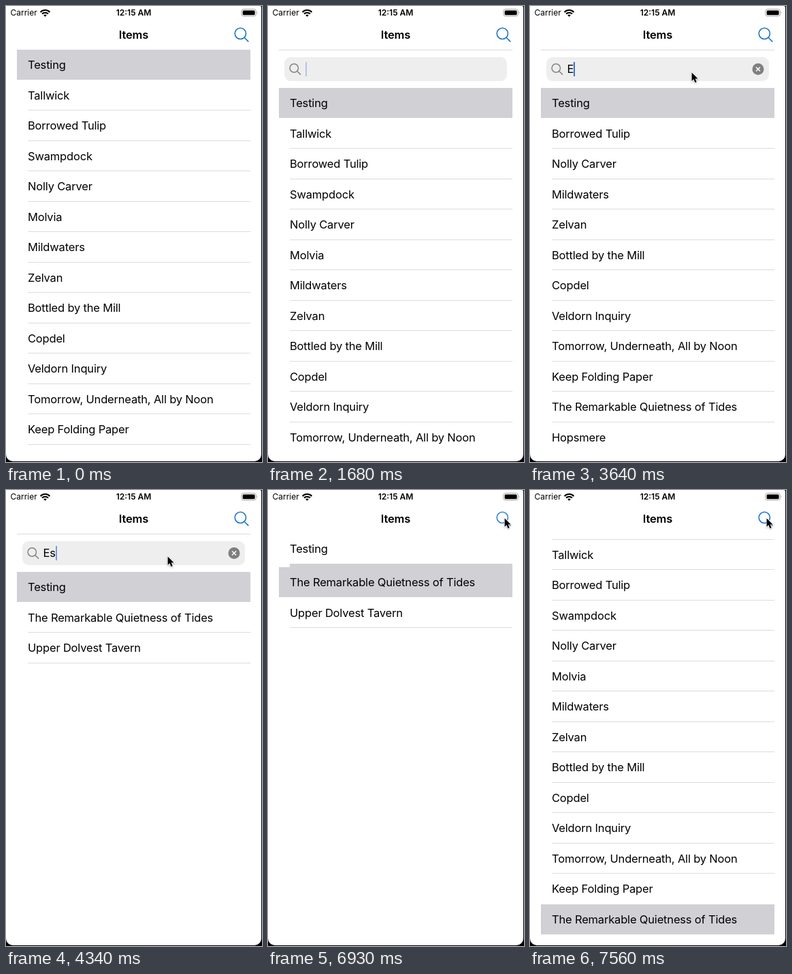
Write an HTML page that moves like this. It is 376 px wide and 668 px high and loops after 8000 ms.

```html
<!DOCTYPE html>
<html lang="en">
<head>
<meta charset="utf-8">
<title>Items</title>
<style>
  html, body { margin: 0; width: 100%; height: 100%; overflow: hidden; background: #000; }
  #screen {
    position: absolute; left: 0; top: 0; width: 375px; height: 667px;
    background: #fff; border-radius: 0 2px 10px 10px; overflow: hidden;
    font: 16.5px Inter, Roboto, sans-serif; letter-spacing: -.18px; color: #000;
  }
  #screen * { position: absolute; white-space: pre; }
  .status { top: 0; line-height: 20px; font-size: 12px; letter-spacing: 0; }
  #carrier { left: 6.5px; }
  #clock { left: 0; width: 375px; text-align: center; font-weight: 600; }
  #title { left: 0; width: 375px; top: 22px; line-height: 40px; text-align: center; font-weight: 600; }
  #screen svg { left: 0; top: 0; }
  #view { left: 16px; top: 64px; width: 343px; height: 587.5px; overflow: hidden; }
  .rule { left: 0; width: 343px; height: 1px; background: #dcdcde; }
  #bar { left: 8px; top: 10.5px; width: 327px; height: 35px; border-radius: 9px; background: #eee; }
  #entry { left: 30.5px; top: 0; line-height: 35px; }
  #screen #entry span { position: static; }
  #screen #caret {
    position: static; display: inline-block; vertical-align: middle;
    width: 2px; height: 21px; margin: -2px 0 0; background: #3f70cf;
  }
  .row { left: 0; width: 343px; height: 44.5px; line-height: 44.5px; text-indent: 16px; background: #fff; z-index: 2; }
  .row::after {
    content: ""; position: absolute; left: 16px; right: 0; bottom: 0;
    height: 1px; background: #dcdcde;
  }
  .row.on { height: 44px; background: #d1d0d5; box-shadow: 0 -1px #fff; z-index: 3; }
  .row.on::after { display: none; }
  #strip { left: 16px; width: 327px; background: #d1d0d5; z-index: 4; }
  #cursor { overflow: visible; filter: drop-shadow(0 1px 1px #0004); }
</style>
</head>
<body>
<div id="screen">
  <div id="carrier" class="status">Carrier</div>
  <div id="clock" class="status">12:15 AM</div>
  <div id="title">Items</div>
  <svg id="icons" width="375" height="64" fill="none">
    <g stroke="#000" stroke-width="2.1">
      <path d="M50.6 9A9.6 9.6 0 0 1 64.4 9M53 11.6A6.3 6.3 0 0 1 62 11.6"/>
    </g>
    <path d="M55.2 13.4Q57.5 11.7 59.8 13.4L57.5 15.8z" fill="#000"/>
    <rect x="345.8" y="4.7" width="21.6" height="10.2" rx="3.2" stroke="#a6a6a6"/>
    <rect x="347.6" y="6.4" width="18" height="6.9" rx="1.6" fill="#000"/>
    <path d="M368.8 8Q370.6 9.8 368.8 11.6z" fill="#a6a6a6"/>
    <g id="lens" stroke="#1b76cb" stroke-width="1.6">
      <circle cx="344.3" cy="40.4" r="8.1"/>
      <path d="M350.1 46.2L356.2 52.4"/>
    </g>
  </svg>
  <div id="view">
    <div class="rule" style="top:0"></div>
    <div class="rule" id="edge"></div>
    <div id="bar">
      <svg width="327" height="35" fill="none" stroke="#858585" stroke-width="1.5">
        <circle cx="14.3" cy="16" r="6.2"/>
        <path d="M18.8 20.5L24 25.6"/>
        <g id="clear">
          <circle cx="311" cy="17.5" r="8.5" fill="#7f7f7f" stroke="none"/>
          <path d="M308 14.5l6 6m0-6l-6 6" stroke="#fff"/>
        </g>
      </svg>
      <div id="entry"><span id="typed"></span><span id="caret"></span></div>
    </div>
    <div id="strip"></div>
  </div>
  <svg id="cursor" width="14" height="20">
    <path d="M.6 .4V13L3.4 10.3L5.4 15.3L7.7 14.3L5.7 9.5H9.6z" fill="#000" stroke="#fff" stroke-width="1.6" paint-order="stroke"/>
  </svg>
</div>
<script>
const LOOP = 8000, PITCH = 44.5, OPEN = 56;
const titles = [
  "Testing", "Tallwick", "Borrowed Tulip", "Swampdock", "Nolly Carver", "Molvia",
  "Mildwaters", "Zelvan", "Bottled by the Mill", "Copdel", "Veldorn Inquiry",
  "Tomorrow, Underneath, All by Noon", "Keep Folding Paper",
  "The Remarkable Quietness of Tides", "Hopsmere", "Upper Dolvest Tavern"
];
const PICK = 13;

const $ = id => document.getElementById(id);
const ramp = (t, from, to) => Math.min(1, Math.max(0, (t - from) / (to - from)));
const easeOut = p => 1 - (1 - p) ** 2;
const easeInOut = p => p < .5 ? 2 * p * p : 1 - 2 * (1 - p) ** 2;

// Slot of every title under a query, -1 when filtered out
function slots(query) {
  let n = 0;
  return titles.map(s => s.toLowerCase().includes(query) ? n++ : -1);
}

const filters = [
  { from: 0, to: 1, slot: slots("") },
  { from: 3340, to: 3630, slot: slots("e") },
  { from: 3730, to: 4060, slot: slots("es") },
  { from: 6912, to: 7212, slot: slots("") }
];

const blinks = [[1050, 1120, 1], [1610, 1750, 0], [1960, 2100, 1], [2660, 2800, 0], [3080, 3150, 1],
  [4340, 4480, 0], [4690, 4830, 1], [5390, 5530, 0], [5740, 5880, 1], [6440, 6580, 0]];

const pointers = [[560, 1680, 345, 40], [2380, 4410, 237, 97], [5040, 5740, 171, 186], [6440, LOOP, 347, 41]];

const rows = titles.map(text => {
  const row = document.createElement("div");
  row.className = "row";
  row.textContent = text;
  $("view").append(row);
  return row;
});

function drawRows(t, open) {
  const k = filters.findLastIndex(f => t >= f.from);
  const now = filters[k], was = filters[Math.max(0, k - 1)];
  const p = easeInOut(ramp(t, now.from, now.to));
  const scroll = 36 * easeInOut(ramp(t, 7200, 7580));
  const picked = t < 5110 ? 0 : PICK;
  const tops = [];

  rows.forEach((row, i) => {
    const a = was.slot[i], b = now.slot[i];
    const shown = k ? (a < 0 ? 0 : 1 - p) + (b < 0 ? 0 : a < 0 ? p * p : p) : 1;
    const slot = a < 0 ? b : b < 0 ? a : a + (b - a) * p;
    tops[i] = open + slot * PITCH - scroll;
    row.style.top = tops[i] + "px";
    row.style.opacity = shown;
    row.style.display = shown > 0 ? "" : "none";
    row.style.zIndex = i === picked ? 3 : a < 0 || b < 0 ? 1 : 2;
    row.classList.toggle("on", i === picked);
  });

  const gap = tops[PICK] - tops[0] - PITCH;
  $("strip").style.display = k === 3 && gap > 0 && gap < 14 ? "" : "none";
  $("strip").style.top = tops[0] + PITCH - 1 + "px";
  $("strip").style.height = gap + 1 + "px";
}

function drawSearch(t, open) {
  const part = open / OPEN;
  $("bar").style.opacity = Math.min(1, part * 1.2);
  $("bar").style.transform = `translateY(${10 * (part - 1)}px)`;
  $("edge").style.top = open - 1 + "px";

  const text = t < 3360 || t >= 6510 ? "" : t < 3710 ? "E" : "Es";
  $("typed").textContent = text;
  $("clear").style.display = text ? "" : "none";
  $("caret").style.opacity = blinks.reduce((v, [from, to, goal]) => v + (goal - v) * ramp(t, from - 70, to), 0);
}

function drawPointer(t) {
  const spot = pointers.find(([from, to]) => t >= from && t < to);
  $("cursor").style.display = spot ? "" : "none";
  if (spot) $("cursor").style.transform = `translate(${spot[2]}px, ${spot[3]}px)`;

  const press = [[580, 630, 1050], [6460, 6580, 7000]].find(([a, , c]) => t >= a && t < c);
  $("lens").style.opacity = press ? .3 + .7 * ramp(t, press[1], press[2]) : 1;
}

const start = performance.now();
function frame() {
  const t = (performance.now() - start) % LOOP;
  const open = OPEN * (easeOut(ramp(t, 630, 945)) - easeOut(ramp(t, 6650, 6920)));
  drawRows(t, open);
  drawSearch(t, open);
  drawPointer(t);
  requestAnimationFrame(frame);
}
frame();
</script>
</body>
</html>
```
